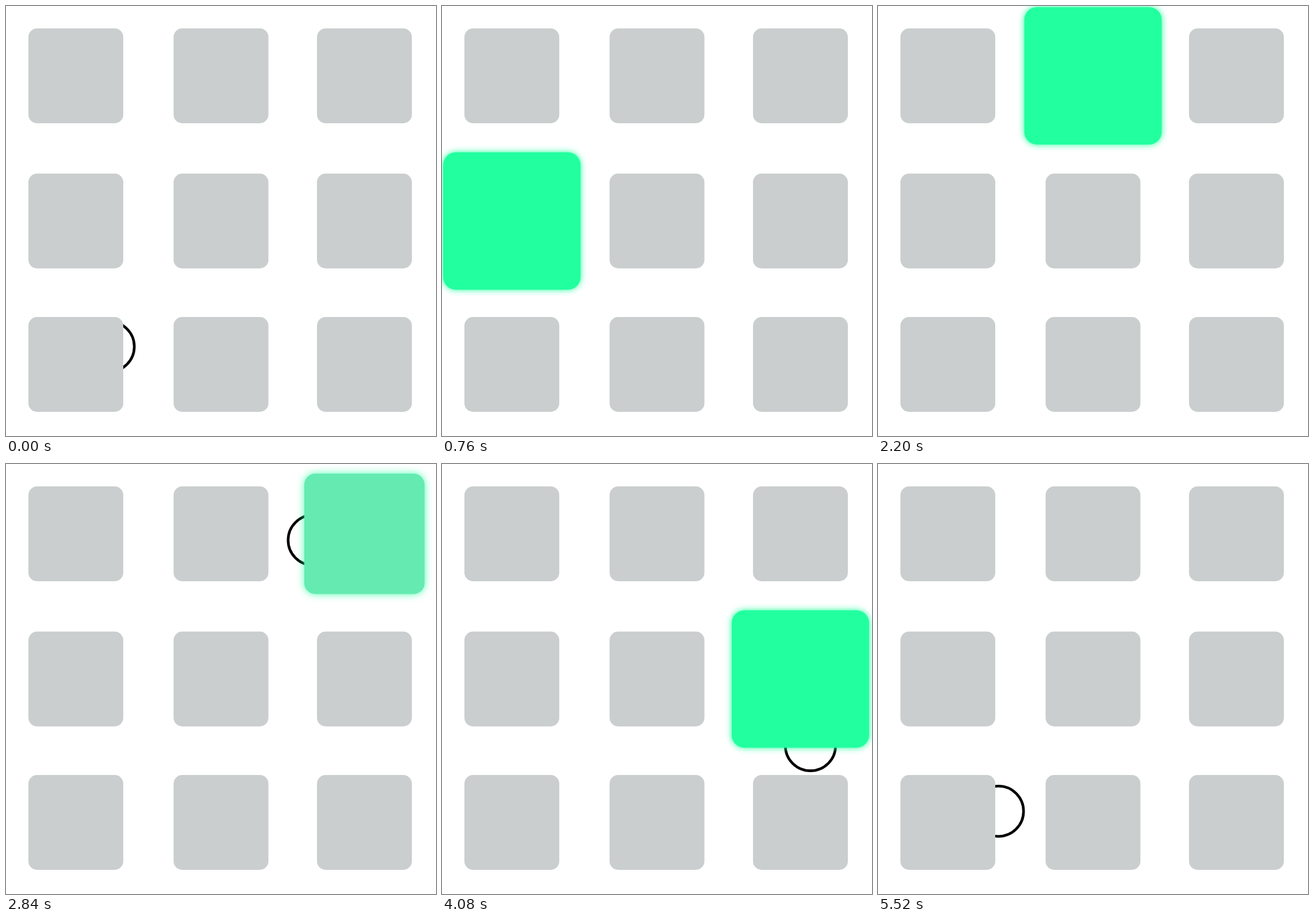
Write an HTML page with a canvas that moves like this. It is 748x748 px and loops after 5.56 s.

```html
<!DOCTYPE html>
<html lang="en">
<head>
<meta charset="utf-8">
<title>Hover grid</title>
<style>
  html, body { margin: 0; height: 100%; overflow: hidden; background: #fff; }
  canvas { display: block; width: 748px; height: 748px; }
</style>
</head>
<body>
<canvas width="748" height="748"></canvas>
<script>
const ctx = document.querySelector('canvas').getContext('2d');
const LOOP = 5560, STEP = 40;
const CENTERS = [121.5, 374, 623.5];
const SIZE = 165, RADIUS = 15, GROWTH = 0.448;
const GLOW = 8, WIDE_GLOW = 16;
const GREY = [202, 206, 206], GREEN = [34, 255, 159];
const GROW_MS = 200, SHRINK_MS = 100, FADE_MS = 40;

// When the ring enters and leaves each outer square, clockwise from bottom left
const HOVERS = [
  [30, 569], [550, 1460], [1534, 1990], [2000, 2700],
  [2720, 3300], [3331, 4080], [4140, 4485], [4595, 5370]
];

// Time and place of the ring in each gap between squares
const PATH = [
  [0, 179.5, 592.5], [580, 122, 487], [1600, 134.5, 223],
  [2040, 260, 117], [2760, 512, 120], [3440, 657.5, 296.6],
  [4100, 638, 495], [4560, 489, 575.5], [5520, 209.5, 604]
];

const clamp = v => Math.min(1, Math.max(0, v));
const mix = (a, b, p) => a + (b - a) * p;

// The centre square is never visited; the others lie 45 degrees apart around it.
const outerSquares = HOVERS.map(([enter, leave], i) => {
  const angle = (3 + i) * Math.PI / 4;
  return {
    x: CENTERS[1 + Math.round(Math.cos(angle))],
    y: CENTERS[1 + Math.round(Math.sin(angle))],
    enter, leave
  };
});
const squares = [{ x: CENTERS[1], y: CENTERS[1], enter: Infinity }, ...outerSquares];

function pathPoint(i) {
  const n = PATH.length, lap = Math.floor(i / n);
  const [t, x, y] = PATH[i - lap * n];
  return [t + lap * LOOP, x, y];
}

// Smooth closed curve through the path points
function ringAt(time) {
  const i = PATH.findLastIndex(p => p[0] <= time);
  const [a, b, c, d] = [-1, 0, 1, 2].map(k => pathPoint(i + k));
  const span = c[0] - b[0], u = (time - b[0]) / span;
  return [1, 2].map(k => {
    const from = (c[k] - a[k]) / (c[0] - a[0]) * span;
    const to = (d[k] - b[k]) / (d[0] - b[0]) * span;
    return b[k] * (1 + 2 * u) * (1 - u) ** 2 + from * u * (1 - u) ** 2
      + c[k] * u * u * (3 - 2 * u) + to * u * u * (u - 1);
  });
}

// Growth tints along with the scale; shrinking keeps the green until the end.
function hoverState({ enter, leave }, time) {
  if (time < enter) return { scale: 1, tint: 0, glow: 0, blur: 0 };
  if (time < leave) {
    const p = clamp((time - enter) / GROW_MS);
    const blur = mix(WIDE_GLOW, GLOW * (1 + GROWTH), p);
    return { scale: 1 + GROWTH * p, tint: p, glow: Math.sqrt(p), blur };
  }
  const scale = 1 + GROWTH * (1 - clamp((time - leave) / SHRINK_MS));
  const tint = 1 - clamp((time - leave - SHRINK_MS) / FADE_MS);
  return { scale, tint, glow: tint, blur: GLOW * scale };
}

function drawSquare({ x, y, scale, tint, glow, blur }) {
  const size = SIZE * scale;
  const color = GREY.map((v, i) => Math.round(mix(v, GREEN[i], tint)));
  ctx.shadowColor = `rgba(${GREEN}, ${glow})`;
  ctx.shadowBlur = blur;
  ctx.fillStyle = `rgb(${color})`;
  ctx.beginPath();
  ctx.roundRect(x - size / 2, y - size / 2, size, size, RADIUS * scale);
  ctx.fill();
  ctx.shadowColor = 'transparent';
}

function drawRing(time) {
  const [x, y] = ringAt(time);
  ctx.strokeStyle = '#000';
  ctx.lineWidth = 4.6;
  ctx.beginPath();
  ctx.arc(x, y, 43.7, 0, Math.PI * 2);
  ctx.stroke();
}

function draw(now) {
  const time = Math.floor((now % LOOP) / STEP) * STEP;
  ctx.fillStyle = '#fff';
  ctx.fillRect(0, 0, 748, 748);
  drawRing(time);
  squares
    .map(square => ({ ...square, ...hoverState(square, time) }))
    .sort((a, b) => a.scale - b.scale)
    .forEach(drawSquare);
}

const start = performance.now();
function tick() {
  draw(performance.now() - start);
  requestAnimationFrame(tick);
}
tick();
</script>
</body>
</html>
```
